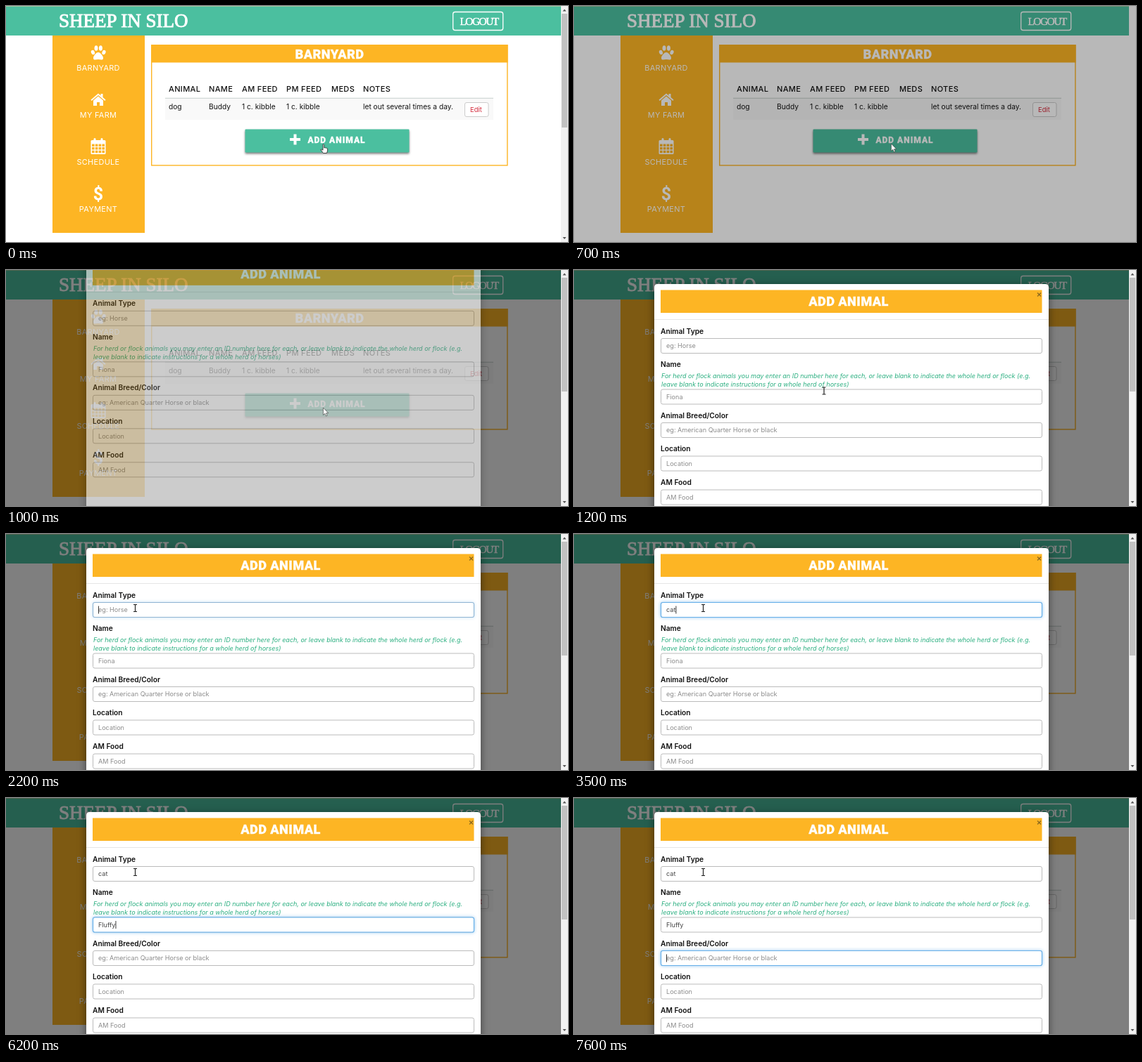
Animation, 798 px wide and 336 px high, one loop 8 s. Source, as an HTML page:

```html
<!DOCTYPE html>
<html lang="en">
<head>
<meta charset="utf-8">
<title>Add animal</title>
<style>
  html, body { margin: 0; width: 100%; height: 100%; overflow: hidden; background: #fff; }
  svg { display: block; width: 798px; height: 336px; font: 400 10.2px Inter, "Open Sans", sans-serif; }
  text { white-space: pre; }
  .slab { font: 27px "Liberation Serif", serif; fill: #fff; stroke: #fff; stroke-width: .9; }
  .logout { font-size: 15.5px; letter-spacing: -1.6px; stroke-width: .5; }
  .heavy { font: 900 18.2px Roboto, sans-serif; letter-spacing: .4px; fill: #fff; stroke: #fff; stroke-width: .3; text-anchor: middle; }
  .small { font-size: 12px; letter-spacing: 1px; }
  .nav text { font-size: 10.9px; letter-spacing: .35px; text-anchor: middle; }
  .nav .dollar { font: 700 25px Roboto, sans-serif; }
  .head { font-size: 11px; font-weight: 500; letter-spacing: .35px; }
  .label { font-weight: 600; fill: #111; }
  .help { font-size: 9px; font-style: italic; fill: #2baf80; }
  .value { font-size: 9.1px; }
  #button { filter: drop-shadow(0 2px 1.5px rgba(0, 0, 0, .5)); }
  #sheet { filter: drop-shadow(0 3px 6px rgba(0, 0, 0, .5)); }
</style>
</head>
<body>
<svg viewBox="0 0 798 336">
  <rect width="798" height="336" fill="#fff"/>
  <g fill="#111">
    <rect width="788" height="42" fill="#4bbf9f"/>
    <rect width="788" height="1" fill="#a3c9a0"/>
    <text class="slab" x="75" y="30">SHEEP IN SILO</text>
    <rect x="634.7" y="8.5" width="71" height="26" rx="3" fill="none" stroke="#fff" stroke-width="1.3"/>
    <text class="slab logout" x="644.5" y="27">LOGOUT</text>

    <g class="nav" fill="#fff">
      <rect x="66" y="42" width="131" height="281" fill="#fdb524"/>
      <ellipse cx="123.4" cy="66" rx="2.5" ry="3.3" transform="rotate(-20 123.4 66)"/>
      <ellipse cx="128" cy="60" rx="2.5" ry="3.8"/>
      <ellipse cx="134.4" cy="60" rx="2.5" ry="3.8"/>
      <ellipse cx="139" cy="66" rx="2.5" ry="3.3" transform="rotate(20 139 66)"/>
      <path d="M131 66c3 0 7 5 7 8 0 4-4 2-7 2s-7 2-7-2c0-3 4-8 7-8z"/>
      <path d="M120.5 133.5 131 124.5l3.5 3V125h3v5l4 3.5-1.2 1.4-9.3-7.9-9.3 7.9z"/>
      <path d="M124 134.5l7-6 7 6v7.5h-5v-5h-4v5h-5z"/>
      <rect x="120.5" y="191" width="21" height="20" rx="1.5"/>
      <path d="M126 189.5v4M136 189.5v4" stroke="#fff" stroke-width="3" stroke-linecap="round"/>
      <path id="cells" fill="#fdb524"/>
      <text class="dollar" x="131" y="276">$</text>
      <text x="131" y="92">BARNYARD</text>
      <text x="131" y="159">MY FARM</text>
      <text x="131" y="226">SCHEDULE</text>
      <text x="131" y="293">PAYMENT</text>
    </g>

    <rect x="206.7" y="55.7" width="505.2" height="171.2" fill="#fff" stroke="#fdb524" stroke-width="1.4"/>
    <rect x="206" y="55" width="506.6" height="25.5" fill="#fdb524"/>
    <text class="heavy" x="459.5" y="74.5">BARNYARD</text>
    <rect x="226" y="131" width="466" height="31" fill="#f9f9f9"/>
    <rect x="226" y="130.7" width="466" height="1.2" fill="#cfd6d4"/>
    <g id="table"></g>
    <rect x="651.5" y="137.5" width="33.5" height="20" rx="2.5" fill="#fff" stroke="#ccc"/>
    <text x="659" y="150.6" font-size="9.4" fill="#d3283a">Edit</text>
    <rect id="button" x="339.5" y="175.5" width="233" height="33" rx="1" fill="#4bbf9f"/>
    <path d="M410.5 182.5v15M403 190h15" stroke="#fff" stroke-width="4"/>
    <text class="heavy small" x="469.5" y="195.3">ADD ANIMAL</text>
  </g>

  <rect id="dim" width="798" height="336"/>

  <g id="modal">
    <path id="sheet" d="M114 700V25q0-5 5-5h550q5 0 5 5v675z" fill="#fff"/>
    <rect x="123" y="28.5" width="541.5" height="32.5" fill="#fdb524"/>
    <text class="heavy" x="390" y="51">ADD ANIMAL</text>
    <text x="656.6" y="37.5" font-size="12" font-weight="600" fill="#8a681f">×</text>
    <path d="M114 70.5h560" stroke="#e5e5e5"/>
    <text class="help" x="124" y="154">For herd or flock animals you may enter an ID number here for each, or leave blank to indicate the whole herd or flock (e.g.</text>
    <text class="help" x="124" y="166.3">leave blank to indicate instructions for a whole herd of horses)</text>
    <g id="form"></g>
  </g>

  <g id="scroll">
    <rect x="788" width="10" height="336" fill="#f1f1f1"/>
    <rect x="789" y="11" width="8" height="162" fill="#c1c1c1"/>
    <path d="M790.5 7.5l2.5-3 2.5 3zM790.5 329l2.5 3 2.5-3z" fill="#555"/>
  </g>

  <g id="pointer">
    <path id="hand" d="M-1 0q1.2-1 1.8.4V5l1.2-.4 1.2.5 1.2.2 1.2.7V9L4.4 12.5H-.5L-4 7.8q.2-1.4 1.8-.4L-1 8.2z"
          fill="#fff" stroke="#222" stroke-width=".8"/>
    <path id="arrow" d="M-.6-1v10.5l2.4-2.2 1.6 3.7 1.7-.8-1.6-3.5h3.3z" fill="#fff" stroke="#333" stroke-width=".6"/>
    <path id="beam" d="M-2.5-5H2.5M0-5V5M-2.5 5H2.5" fill="none" stroke="#222" stroke-width="1.2"/>
  </g>
</svg>
<script>
const $ = id => document.getElementById(id);
const show = (el, on) => el.style.display = on ? '' : 'none';
const ramp = (t, a, b) => Math.min(1, Math.max(0, (t - a) / (b - a)));

let cells = '';
for (let row = 0; row < 3; row++)
  for (let col = 0; col < 4; col++)
    cells += `M${122 + col * 4.8} ${196.5 + row * 4.6}h3.6v3.5h-3.6z`;
$('cells').setAttribute('d', cells);

$('table').innerHTML = [
  [231, 'ANIMAL', 'dog'], [288, 'NAME', 'Buddy'], [335, 'AM FEED', '1 c. kibble'],
  [398, 'PM FEED', '1 c. kibble'], [462, 'MEDS', ''], [507, 'NOTES', 'let out several times a day.']
].map(([x, head, cell]) =>
  `<text class="head" x="${x}" y="122">${head}</text><text x="${x}" y="147">${cell}</text>`).join('');

// keys: when each letter appears; focus: gain and loss; blink: caret hidden
const fields = [
  { y: 97.5, labelY: 90.5, label: 'Animal Type', hint: 'eg: Horse', word: 'cat',
    keys: [2500, 2700, 3000], focus: [2100, 3500], blink: [0, 0] },
  { y: 170, labelY: 138, label: 'Name', hint: 'Fiona', word: 'Fluffy',
    keys: [5000, 5300, 5600, 6000, 6100, 6200], focus: [3500, 6500], blink: [4200, 4600] },
  { y: 217.5, labelY: 210.5, label: 'Animal Breed/Color', hint: 'eg: American Quarter Horse or black',
    focus: [6500, 9000], blink: [7200, 7600] },
  { y: 265, labelY: 258, label: 'Location', hint: 'Location' },
  { y: 313, labelY: 306, label: 'AM Food', hint: 'AM Food' }
];

$('form').innerHTML = fields.map(f => `
  <text class="label" x="123" y="${f.labelY}">${f.label}</text>
  <g><rect x="123.5" y="${f.y}" width="541" height="21" rx="2.5" fill="#fff" stroke="#bbb"/>
  <rect x="123.5" y="${f.y}" width="541" height="21" rx="2.5" fill="#fff" stroke="#66afe9" stroke-width="1.2"
    style="filter:drop-shadow(0 0 2.5px rgba(102,175,233,.7))"/>
  <text class="value" x="131" y="${f.y + 13.8}">${f.hint}</text>
  <path stroke="#222" stroke-width=".9"/></g>`).join('');

fields.forEach((f, i) => {
  [, f.glow, f.text, f.caret] = $('form').querySelectorAll('g')[i].children;
});

function drawField(f, t) {
  const [gain, loss] = f.focus || [9000, 9000];
  const typed = f.word ? f.word.slice(0, f.keys.filter(k => t >= k).length) : '';
  f.text.textContent = typed || f.hint;
  f.text.setAttribute('fill', typed ? '#444' : '#8c8c8c');
  f.glow.style.opacity = ramp(t, gain, gain + 200) - ramp(t, loss, loss + 200);

  const caretOn = t > gain && t <= loss && !(t >= f.blink[0] && t < f.blink[1]);
  show(f.caret, caretOn);
  if (caretOn) {
    const x = 131.5 + (typed ? f.text.getComputedTextLength() : 0);
    f.caret.setAttribute('d', `M${x} ${f.y + 5}v11`);
  }
}

const path = [[0, 451, 197], [1000, 451, 197], [1200, 355, 172], [2100, 183.5, 105.5], [8000, 183.5, 105.5]];

function drawPointer(t) {
  const i = path.findIndex(p => p[0] > t);
  const [a, b] = [path[i - 1], path[i]];
  const k = ramp(t, a[0], b[0]);
  $('pointer').setAttribute('transform', `translate(${a[1] + (b[1] - a[1]) * k} ${a[2] + (b[2] - a[2]) * k})`);
  show($('hand'), t < 400);
  show($('arrow'), t >= 400 && t < 1100);
  show($('beam'), t >= 1100);
}

function draw(now) {
  const t = Math.floor(now % 8000 / 100) * 100;
  $('dim').style.opacity = .5 * ramp(t, 515, 845);
  const enter = ramp(t, 850, 1200);
  show($('modal'), enter > 0);
  $('modal').style.opacity = Math.min(1, enter * 1.4);
  $('modal').setAttribute('transform', `translate(0 ${-120 * (1 - enter) ** 2})`);
  show($('scroll'), t < 400 || t >= 900);
  fields.forEach(f => drawField(f, t));
  drawPointer(t);
}

const start = performance.now();
function tick() {
  draw(performance.now() - start);
  requestAnimationFrame(tick);
}
tick();
</script>
</body>
</html>
```
